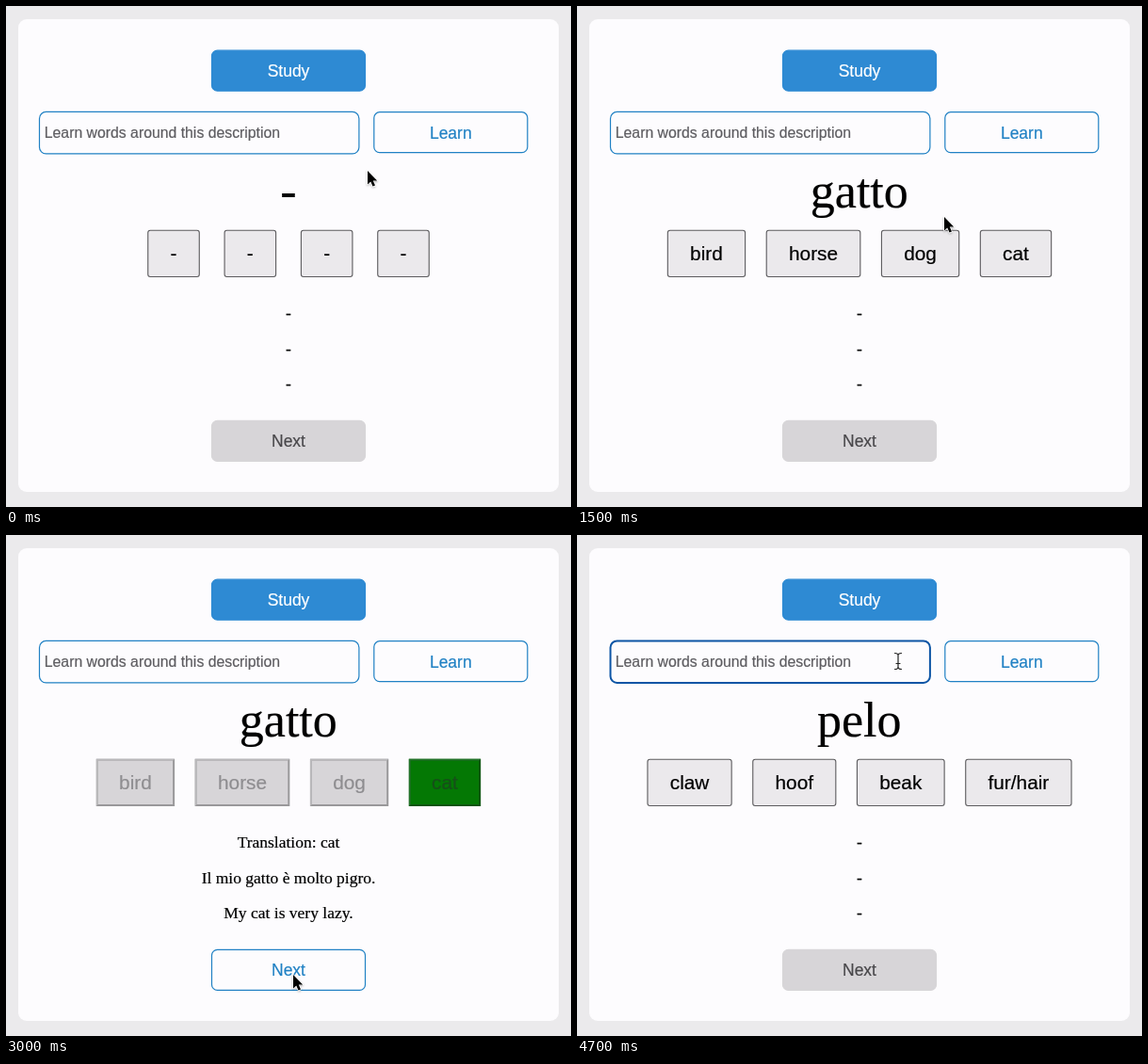
Animation of 600 by 532 pixels, one loop 5 s. Source, as an HTML page:

```html
<!DOCTYPE html>
<html lang="en">
<head>
<meta charset="utf-8">
<title>Word study</title>
<style>
html, body { margin: 0; width: 100%; height: 100%; overflow: hidden; background: #ebeaec; }
svg { display: block; width: 100%; height: 100%; }
text { font-family: "Liberation Sans", Arial, sans-serif; text-anchor: middle; stroke-width: .2; }
.serif { font-family: "Liberation Serif", "Times New Roman", serif; }
.left { text-anchor: start; }
</style>
</head>
<body>
<svg viewBox="0 0 600 532">
  <defs>
    <filter id="soft" x="-50%" y="-50%" width="200%" height="200%">
      <feDropShadow dx="0" dy="1" stdDeviation="1" flood-opacity=".3"/>
    </filter>
  </defs>
  <rect width="600" height="532" fill="#ebeaec"/>
  <rect x="13" y="14" width="574" height="502" rx="9" fill="#fdfcfe"/>
  <g id="ui"></g>
  <circle id="press" r="23.5" fill="none" stroke="#111" stroke-width="1.7"/>
  <g id="arrow" filter="url(#soft)">
    <path d="M0 0V14.5L3.3 11.4L5.5 16.6L8 15.6L5.8 10.4H10.2Z" fill="#000"
      stroke="#fff" stroke-width="1.2" stroke-linejoin="round" paint-order="stroke"/>
    <g id="ban" transform="translate(11 24.5)" fill="none">
      <circle r="8.3" fill="#f4f4f4" fill-opacity=".35" stroke="#4a4a4a" stroke-width="4"/>
      <path d="M-5.6 -5.6L5.6 5.6" stroke="#4a4a4a" stroke-width="4"/>
      <circle r="8.3" stroke="#f6f6f6" stroke-width="2.3"/>
      <path d="M-5.9 -5.9L5.9 5.9" stroke="#f6f6f6" stroke-width="2.3"/>
    </g>
  </g>
  <path id="beam" d="M-3.5 -8.5Q0 -8.5 0 -6Q0 -8.5 3.5 -8.5M0 -6V6M-3.5 8.5Q0 8.5 0 6Q0 8.5 3.5 8.5M-2 2.5H2"
    fill="none" stroke="#222" stroke-width="1.2" stroke-linecap="round"/>
</svg>
<script>
const $ = id => document.getElementById(id);
const STEP = 100, STEPS = 50;
const BLUE = '#2e8ad3', LINE = '#2081c4', GREY = '#d7d5d8', CARD = '#fdfcfe';
const CARD_SIZE = 20.8, CARD_Y = 238.2, CARD_H = 49.3;

// Pointer moves: [first step, last step, x, y]; it rests in between.
const home = [384, 175];
const moves = [
  [0, 2, 454, 168], [2, 6, 327, 73],
  [9, 15, 390, 224], [15, 18, 456, 257],
  [21, 30, 305, 467], [30, 32, 305, 474], [32, 34, 304, 458], [35, 36, 305, 429],
  [36, 41, 479, 66], [41, 43, 341, 134]
];
const PICK = 6, ANSWER = 18, NEXT = 32, FOCUS = 43;
const presses = [PICK, ANSWER, NEXT, FOCUS];

const centred = (x, y, w = 163, h = 43) => [x - w / 2, y - h / 2, w, h];
const boxes = {
  study: centred(300, 68.7),
  learn: centred(472.3, 134.2),
  input: centred(205.2, 134.7, 339.4, 44.5),
  next: centred(300, 461.9)
};

const choices = {
  '-': ['-', '-', '-', '-'],
  gatto: ['bird', 'horse', 'dog', 'cat'],
  pelo: ['claw', 'hoof', 'beak', 'fur/hair']
};
const notes = ['Translation: cat', 'Il mio gatto è molto pigro.', 'My cat is very lazy.'];

const pen = document.createElement('canvas').getContext('2d');
pen.font = `${CARD_SIZE}px "Liberation Sans", Arial, sans-serif`;

// Cards fit their labels, and the row is centred on the stage.
function layout(word) {
  const gap = word === '-' ? 26.8 : 22.6;
  const row = choices[word].map(label => ({ label, w: pen.measureText(label).width + 47.6 }));
  let x = 300 - (row.reduce((sum, c) => sum + c.w + gap, -gap)) / 2;
  for (const c of row) {
    c.box = [x, CARD_Y, c.w, CARD_H];
    x += c.w + gap;
  }
  return row;
}

function pointer(step) {
  let [x, y] = home;
  for (const [from, to, tx, ty] of moves) {
    const k = Math.min(1, Math.max(0, (step - from) / (to - from)));
    const ease = k * k * (3 - 2 * k);
    x += (tx - x) * ease;
    y += (ty - y) * ease;
  }
  return [x, y];
}

const inside = ([px, py], [x, y, w, h]) => px >= x && px <= x + w && py >= y && py <= y + h;

const rect = ([x, y, w, h], fill, stroke, width = 1.2, r = 6) =>
  `<rect x="${x}" y="${y}" width="${w}" height="${h}" rx="${r}" fill="${fill}" stroke="${stroke}" stroke-width="${width}"/>`;

const text = (s, x, y, size, ink = '#000', cls = '') =>
  `<text x="${x}" y="${y}" font-size="${size}" fill="${ink}" stroke="${ink}" class="${cls}">${s}</text>`;

function button(box, label, style) {
  const [fill, stroke, ink] = {
    solid: [BLUE, BLUE, '#fff'],
    outline: [CARD, LINE, LINE],
    off: [GREY, GREY, '#48474a']
  }[style];
  return rect(box, fill, stroke) + text(label, box[0] + box[2] / 2, box[1] + 27.8, 17.5, ink);
}

function card({ label, box }, done) {
  const [x, y, w, h] = box;
  const [fill, light, dark, ink] = label === 'cat'
    ? ['#047804', '#23742a', '#0c5410', '#174f1a']
    : [GREY, '#b9b8ba', '#99989a', '#8e8d90'];
  const name = text(label, x + w / 2, 270, CARD_SIZE, done ? ink : '#000');
  if (!done) return rect(box, '#ebe9ec', '#5c5b5e', 1.1, 2.5) + name;
  const l = x - .5, t = y - .5, r = x + w + .5, b = y + h + .5, e = 2;
  return `<path d="M${l} ${t}H${r}V${b}H${l}Z" fill="${dark}"/>` +
    `<path d="M${l} ${t}H${r}L${r - e} ${t + e}H${l + e}V${b - e}L${l} ${b}Z" fill="${light}"/>` +
    `<path d="M${l + e} ${t + e}H${r - e}V${b - e}H${l + e}Z" fill="${fill}"/>` + name;
}

function draw(step) {
  const at = pointer(step);
  const over = name => inside(at, boxes[name]);
  const word = step <= PICK ? '-' : step <= NEXT ? 'gatto' : 'pelo';
  const done = step > ANSWER && step <= NEXT;
  const focus = step >= FOCUS;
  const row = layout(word);

  $('ui').innerHTML = [
    button(boxes.study, 'Study', over('study') ? 'outline' : 'solid'),
    rect(boxes.input, CARD, focus ? '#0d55a5' : LINE, focus ? 2 : 1.2, 7),
    text('Learn words around this description', 40.8, 140, 15.8, '#5d5c60', 'left'),
    step > FOCUS && step < FOCUS + 4 ? '<path d="M41.8 125.5V143.5" stroke="#000"/>' : '',
    button(boxes.learn, 'Learn', 'outline'),
    text(word, 299.8, 214, 52, '#000', 'serif'),
    ...row.map(c => card(c, done)),
    ...notes.map((s, i) => text(done ? s : '-', 300, 332 + i * 37.6, 17.5, '#000', 'serif')),
    button(boxes.next, 'Next', !done ? 'off' : over('next') ? 'outline' : 'solid')
  ].join('');

  const visible = {
    press: presses.includes(step),
    arrow: !over('input'),
    beam: over('input'),
    ban: done ? row.some(c => inside(at, c.box)) : over('next')
  };
  for (const id in visible) $(id).style.display = visible[id] ? '' : 'none';
  for (const id of ['press', 'arrow', 'beam']) $(id).setAttribute('transform', `translate(${at})`);
}

let start, last = -1;
function tick(now) {
  start ??= now;
  const step = Math.floor((now - start) / STEP) % STEPS;
  if (step !== last) draw(step);
  last = step;
  requestAnimationFrame(tick);
}
draw(0);
requestAnimationFrame(tick);
</script>
</body>
</html>
```
